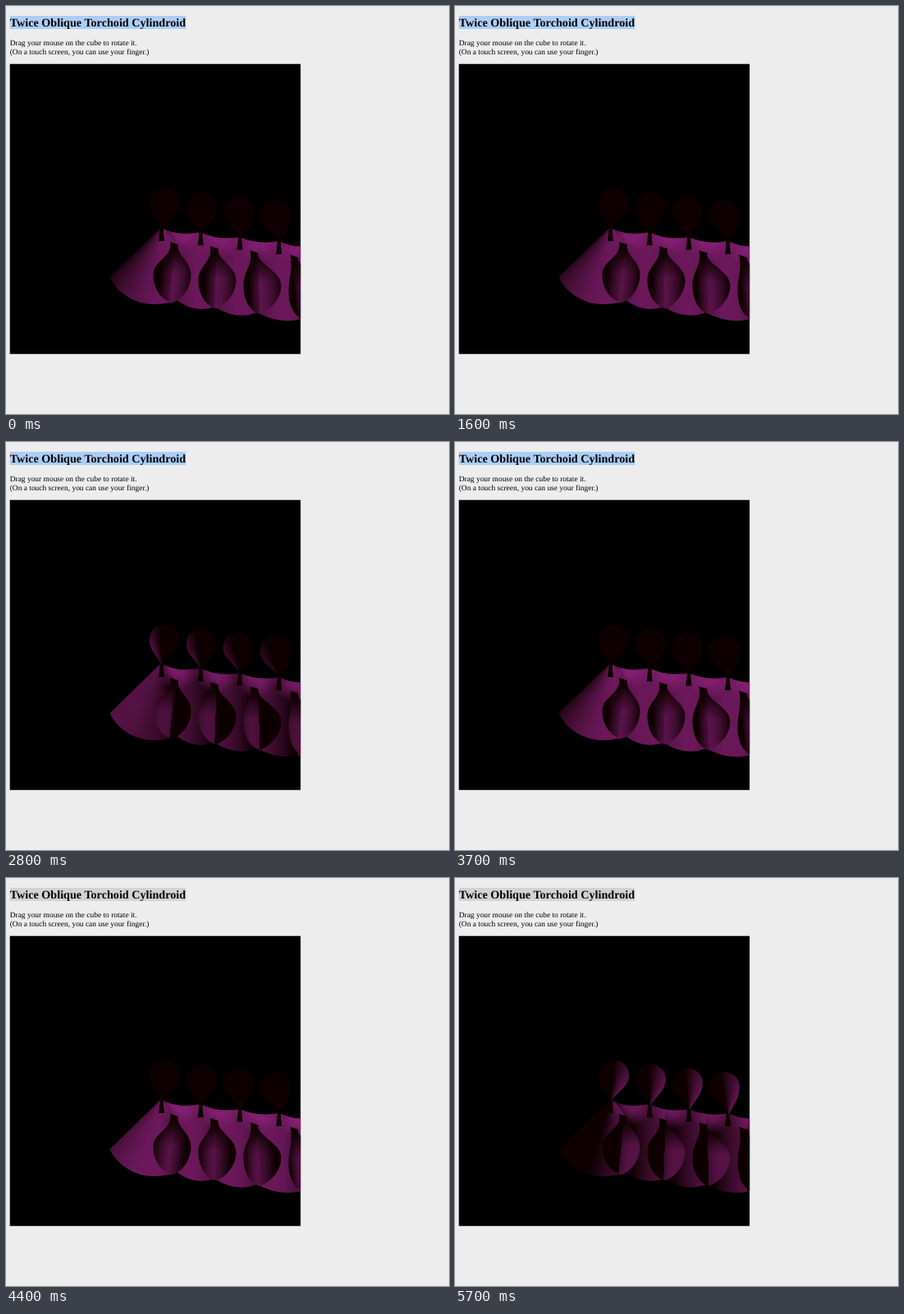
Animation, 540 px wide and 498 px high, one loop 5800 ms. Source, as an HTML page with a canvas:

```html
<!DOCTYPE html>
<html lang="en">
<head>
<meta charset="utf-8">
<title>Torchoid Cylindroid</title>
<style>
  html, body { margin: 0; width: 100%; height: 100%; overflow: hidden; background: #ededed; }
  canvas, svg { position: absolute; left: 0; top: 0; width: 540px; height: 498px; }
  text {
    font-family: "Liberation Serif", "Times New Roman", serif;
    font-size: 9.45px;
    text-rendering: geometricPrecision;
  }
  .title { font-size: 14.17px; font-weight: bold; }
</style>
</head>
<body>
<canvas id="stage" width="540" height="498"></canvas>
<svg viewBox="0 0 540 498">
  <rect id="mark" x="4.7" y="12" width="214.6" height="16"/>
  <text class="title" x="4.7" y="24.6">Twice Oblique Torchoid Cylindroid</text>
  <text x="4.7" y="48.4">Drag your mouse on the cube to rotate it.</text>
  <text x="4.7" y="59.2">(On a touch screen, you can use your finger.)</text>
</svg>
<script>
const LOOP = 5800, STEP = 100;
const ctx = document.getElementById('stage').getContext('2d');
const mark = document.getElementById('mark');

// Light azimuth in degrees over time: 0 front, 90 right, 180 back.
const turn = [
  [0, 18], [600, 24], [700, 45], [900, 100], [1000, 190], [1200, 345],
  [1600, 370], [2100, 370], [2500, 535], [2800, 665], [3100, 732],
  [3600, 732], [3700, 734], [3800, 760], [4100, 975], [4200, 1050],
  [4500, 1080], [5200, 1080], [5300, 1081], [5700, 1155]
];

const cosd = a => Math.cos(a * Math.PI / 180);
const sind = a => Math.sin(a * Math.PI / 180);
const clamp = v => Math.max(0, Math.min(1, v));

function lightAt(t) {
  for (let i = 1; i < turn.length; i++) {
    const [t0, a0] = turn[i - 1], [t1, a1] = turn[i];
    if (t <= t1) return a0 + (a1 - a0) * (t - t0) / (t1 - t0);
  }
  return turn[turn.length - 1][1];
}

function shade(k, alpha = 1) {
  const c = [14 + 108 * k, 28 * k, 1 + 104 * k].map(Math.round);
  return `rgba(${c},${alpha})`;
}

// Adds stops for u running from u0 to u1 over the offsets p0 to p1.
function ramp(grad, p0, p1, u0, u1, tone) {
  for (let i = 0; i <= 12; i++) {
    const f = i / 12;
    grad.addColorStop(p0 + (p1 - p0) * f, shade(tone(u0 + (u1 - u0) * f)));
  }
  return grad;
}

const skirt = new Path2D(`M188 271 L126.5 331 C137 353 160 364 179 364
  C192 364 200 362 208 359 Q231 376 254 367 Q281 384 306 374 Q333 389 360 382 L362 293
  Q350 295 333 287 Q307 292 285 282 Q259 287 237 276 Q211 282 190 271 Z`);

function drawSkirt(light) {
  const front = clamp(cosd(light) + 0.35 + 0.2 * sind(light));
  const side = 0.4 * Math.max(0, -sind(light));
  const tone = power => u => 0.86 * power * Math.max(0, cosd(light - 65 * u)) ** 0.8;

  ctx.save();
  ctx.clip(skirt);

  const fan = ctx.createConicGradient(Math.PI * 0.3, 191, 268);
  ctx.fillStyle = ramp(fan, 0, 0.225, 1.1, -1, tone(Math.max(front, side)));
  ctx.fillRect(120, 260, 87, 110);

  for (let i = 0; i < 4; i++) {
    const x = 206 + 50 * i;
    const g = ctx.createLinearGradient(x, 0, x + 50, 0);
    ctx.fillStyle = ramp(g, 0, 1, -0.5, 0.7, tone(front));
    ctx.fillRect(x, 260, 51, 130);
  }

  // Upward facing saddles between the necks stay lit all the way round.
  const k = 0.8 + 0.3 * cosd(light);
  for (let i = 0; i < 4; i++) {
    const x = 213 + 48 * i + 5 * sind(light), y = 275 + 5.3 * i;
    const glow = ctx.createRadialGradient(x, y, 0, x, y, 27);
    glow.addColorStop(0, shade(k));
    glow.addColorStop(0.35, shade(k, 0.9));
    glow.addColorStop(1, shade(k, 0));
    ctx.fillStyle = glow;
    ctx.fillRect(x - 28, y - 20, 56, 48);
  }
  ctx.restore();
}

function drawPetal(i, light) {
  const tx = 206 + 48.8 * i, ty = 289 + 5.3 * i;
  const cx = 202.5 + 55 * i, cy = 328 + 6.5 * i;
  const bx = 202 + 53.5 * i, by = 362.5 + 6.7 * i;
  const power = 0.72 * clamp((cosd(light) + 0.6 + 0.25 * sind(light)) / 1.2);
  const tone = s => u => power * Math.max(0, cosd(light - 25 * s - 75 * u));

  ctx.save();
  ctx.beginPath();
  ctx.moveTo(tx - 6, ty - 1);
  ctx.lineTo(tx + 4, ty + 2);
  ctx.bezierCurveTo(tx + 1, ty + 15, cx + 22.5, cy - 18, cx + 23, cy);
  ctx.bezierCurveTo(cx + 23, cy + 18, bx + 11, by - 3, bx, by);
  ctx.bezierCurveTo(bx - 12, by - 4, cx - 23, cy + 18, cx - 23, cy);
  ctx.bezierCurveTo(cx - 23, cy - 18, tx - 2, ty + 18, tx - 6, ty - 1);
  ctx.clip();

  const tilt = (3 - 2 * i) / 30, crease = 0.5 - 0.045 * i;
  const g = ctx.createLinearGradient(cx - 23, cy - 23 * tilt, cx + 23, cy + 23 * tilt);
  ramp(g, 0, crease, -1, 0, tone(-1));
  ramp(g, crease, 1, 0, 1, tone(1));
  ctx.fillStyle = g;
  ctx.fillRect(cx - 30, ty - 3, 60, 85);

  const top = ctx.createLinearGradient(0, ty, 0, ty + 38);
  top.addColorStop(0, shade(0));
  top.addColorStop(0.3, shade(0, 0.85));
  top.addColorStop(1, shade(0, 0));
  ctx.fillStyle = top;
  ctx.fillRect(cx - 30, ty - 3, 60, 42);
  ctx.restore();
}

function drawBulb(i, light) {
  const tx = 190 + 47.7 * i, ty = 271 + 5.3 * i;
  const cx = 193.5 + 44.9 * i, cy = 242 + 4.8 * i, r = 18.6;

  ctx.fillStyle = shade(0.9 * Math.max(0, -1.3 * cosd(light) - 0.5));
  ctx.beginPath();
  ctx.moveTo(tx - 2, ty - 4);
  ctx.lineTo(tx + 2, ty - 4);
  ctx.quadraticCurveTo(tx + 1.5, ty + 5, tx + 3, ty + 16);
  ctx.lineTo(tx - 4, ty + 16);
  ctx.quadraticCurveTo(tx - 2.5, ty + 5, tx - 2, ty - 4);
  ctx.fill();

  const power = 0.85 * (1 - 0.15 * i * Math.max(0, -sind(light)));
  const tone = s => u => power * Math.max(0, cosd(light - 180 + 20 * s + 65 * u));
  const axis = Math.atan2(cy - ty, cx - tx), half = 0.72;
  const fan = ctx.createConicGradient(axis - half, tx, ty + 2);
  const mid = half / (2 * Math.PI);
  ramp(fan, 0, mid, -1, 0, tone(-1));
  ramp(fan, mid, 2 * mid, 0, 1, tone(1));
  ctx.fillStyle = fan;
  ctx.beginPath();
  ctx.moveTo(tx - 1, ty + 1);
  ctx.bezierCurveTo(tx - 3, ty - 8, cx - r, cy + 13, cx - r, cy);
  ctx.arc(cx, cy - 1, r, Math.PI, 0);
  ctx.bezierCurveTo(cx + r, cy + 13, tx + 5, ty - 8, tx + 1, ty + 1);
  ctx.fill();
}

function draw(now) {
  const t = Math.floor((now % LOOP) / STEP) * STEP;
  const light = lightAt(t);
  mark.setAttribute('fill', t < 4000 ? '#accef7' : '#d3d3d3');

  ctx.clearRect(0, 0, 540, 498);
  ctx.save();
  ctx.beginPath();
  ctx.rect(4.7, 70.8, 354.4, 354);
  ctx.clip();
  ctx.fillStyle = '#000';
  ctx.fillRect(0, 60, 370, 380);
  drawSkirt(light);
  for (let i = 0; i < 4; i++) drawPetal(i, light);
  for (let i = 0; i < 4; i++) drawBulb(i, light);
  ctx.restore();
}

const start = performance.now();
function tick() {
  draw(performance.now() - start);
  requestAnimationFrame(tick);
}
tick();
</script>
</body>
</html>
```
